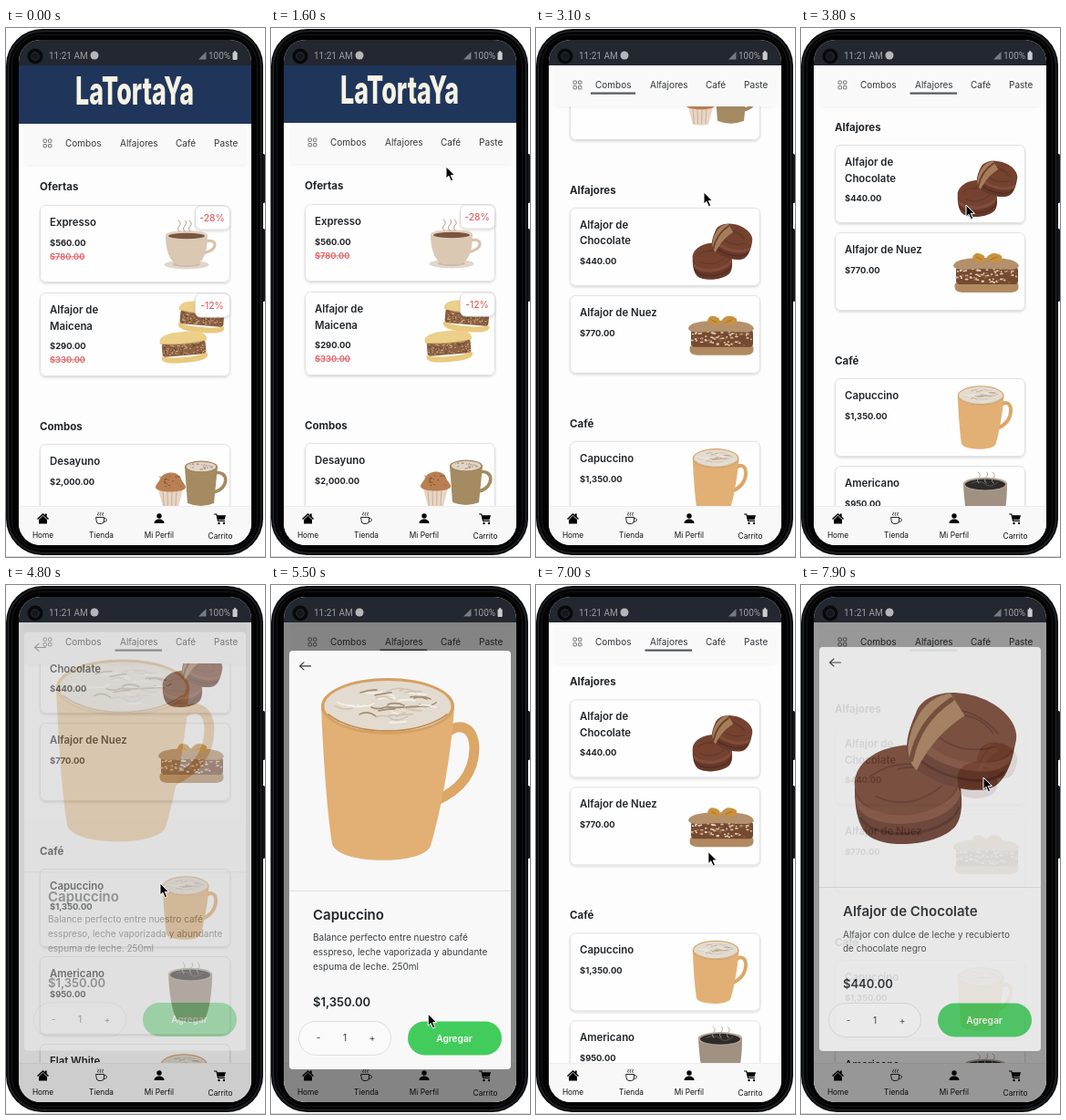
An HTML page that plays this animation: 284 by 580 pixels, repeating every 8 s.

```html
<!DOCTYPE html>
<html lang="es">
<head>
<meta charset="utf-8">
<title>Cafetería</title>
<style>
html, body { margin: 0; width: 100%; height: 100%; overflow: hidden; background: #fff; }
svg { display: block; width: 284px; height: 580px; font-family: Inter, "Open Sans", sans-serif; }
</style>
</head>
<body>
<svg id="stage" viewBox="0 0 284 580" xmlns="http://www.w3.org/2000/svg"></svg>
<script>
const INK = '#212529', RED = '#df6265';

// c is the vertical centre of the capitals
function text(x, c, size, str, { w = 400, fill = INK, more = '' } = {}) {
  return `<text x="${x}" y="${(c + size * 0.36).toFixed(2)}" font-size="${size}" font-weight="${w}" fill="${fill}" ${more}>${str}</text>`;
}
const rect = (x, y, w, h, r, fill, more = '') =>
  `<rect x="${x}" y="${y}" width="${w}" height="${h}" rx="${r}" fill="${fill}" ${more}/>`;
const oval = (x, y, rx, ry, fill, more = '') =>
  `<ellipse cx="${x}" cy="${y}" rx="${rx}" ry="${ry}" fill="${fill}" ${more}/>`;
const path = (d, fill, more = '') => `<path d="${d}" fill="${fill}" ${more}/>`;
const line = (d, stroke, w = 1) =>
  path(d, 'none', `stroke="${stroke}" stroke-width="${w}" stroke-linecap="round" stroke-linejoin="round"`);
const at = (x, y, body, more = '') => `<g transform="translate(${x} ${y}) ${more}">${body}</g>`;
const centred = 'text-anchor="middle"';

function seeded(seed) {
  return () => (seed = (seed * 16807) % 2147483647) / 2147483647;
}
function specks(n, x, y, w, h, fill, size, seed) {
  const rnd = seeded(seed);
  let out = '';
  for (let i = 0; i < n; i++) {
    out += oval((x + rnd() * w).toFixed(1), (y + rnd() * h).toFixed(1), (size * (0.6 + rnd())).toFixed(1), (size * 0.7).toFixed(1), fill);
  }
  return out;
}
const steam = (xs, y, stroke) =>
  xs.map((x, i) => line(`M${x} ${y}q-3-3 0-6t${i % 2 ? 1 : -1}-6`, stroke, 0.9)).join('');

// ---- food drawings ----
function espresso() {
  return oval(198, 259.5, 24.5, 5, '#e2d5cc') + oval(198, 259, 15, 3, '#cdbaa8') +
    line('M219 234c14-4 14 11-4 13', '#d6c1aa', 3) +
    path('M175 227c0 18 5 30 14 33h18c10-3 14-15 14-33z', '#dac8b3') +
    oval(198, 227, 23, 5, '#e2d2c0') + oval(198, 228, 20, 3.2, '#7a5641') +
    steam([190, 196, 202], 223, '#a58f82');
}
function sandwich(x, y, turn, seed) {
  return at(x, y,
    rect(-24, -6, 48, 15, 3, '#8e6143') + specks(80, -23, -4, 46, 12, '#d6b790', 0.7, seed) +
    specks(45, -23, -4, 46, 12, '#5f3d2a', 0.7, seed + 8) +
    path('M-26-7c0-7 8-10 26-10s26 3 26 10c0 4-52 4-52 0z', '#ecd08a') +
    path('M-25 8c8 4 42 4 50 0 2 6-4 9-25 9s-27-3-25-9z', '#e9c97e') +
    line('M-25-6c14 3 36 3 50 0', '#d8b56e', 0.8), `rotate(${turn})`);
}
function breakfast() {
  return path('M167 506l5 19q9 2 17 0l5-19z', '#e7d6c5') +
    [172, 177, 182, 187].map(x => line(`M${x} 508l${(180 - x) * 0.15} 16`, '#c4a48b', 0.8)).join('') +
    path('M164 504c0-4 4-6 5-10 4-8 19-9 23 0 1 4 5 6 5 10-2 6-31 6-33 0z', '#b97f52') +
    specks(16, 169, 491, 23, 13, '#855235', 0.9, 31) +
    line('M228 488c17-4 17 17 0 21', '#a48b62', 3.6) +
    path('M196 481l3 40q15 6 29 0l4-40z', '#a48b62') +
    oval(214, 481, 18, 6.4, '#a1835e') + oval(214, 481, 16.3, 5.2, '#e0d5c8') +
    specks(24, 202, 478, 24, 6, '#a88a72', 0.8, 77);
}
function nutBar() {
  return path('M169 768c20-3 49-3 69 0 2 8-2 10-10 10h-48c-9 0-13-2-11-10z', '#b18a62') +
    rect(170, 750, 68, 19, 4, '#754a31') + specks(62, 171, 751, 65, 16, '#e0cab0', 1.3, 5) +
    specks(36, 171, 751, 65, 16, '#93623f', 1.2, 15) +
    path('M167 749c1-7 14-9 36-9s34 2 36 9c-3 6-13 3-36 3s-33 3-36-3z', '#b4906c') +
    path('M188 741c1-8 8-7 13-3 2 6-1 8-6 7zM203 741c4-8 12-7 17-3 1 6-4 8-10 7z', '#c9923f') +
    line('M192 739l6 3M208 742l7-3', '#9b6a2b', 0.8);
}
function americano() {
  return path('M178 988c1 22 4 40 9 49 8 4 24 4 31 0 5-10 8-28 8-49z', '#a19182') +
    oval(202, 988, 24.3, 7.3, '#b3a496') + oval(202, 988.5, 22, 6, '#2d2a29') +
    line('M187 987q9-4 15 1t14-2', '#5a5653', 0.9) + steam([195, 203, 211], 987, '#aaa39d');
}
// the next two are drawn at dialog size around their own centre
function mug() {
  const rnd = seeded(19);
  let foam = '';
  for (let i = 0; i < 34; i++) {
    const a = rnd() * 6.28, r = Math.sqrt(rnd());
    const x = -24 + Math.cos(a) * r * 48, y = -69 + Math.sin(a) * r * 20;
    foam += line(`M${x.toFixed(0)} ${y.toFixed(0)}q9 ${(rnd() * 10 - 5).toFixed(0)} 18 ${(rnd() * 6 - 3).toFixed(0)}`,
      ['#cfc3b4', '#f5f1ea', '#a48d76'][i % 3], 1.6);
  }
  return line('M47-36C60-52 81-50 81-22C80 8 62 24 40 34', '#dca666', 11) +
    path('M-87-68C-85-20-81 45-75 82C-68 105 24 106 33 84C45 44 56-20 59-68z', '#e2b074') +
    oval(-14, -69, 73, 31, '#d5a062') + oval(-14, -69, 69.5, 28, '#e3dbcf') + foam +
    line('M-79-60C-50-36 20-36 51-60', '#bf8a50', 1.6);
}
function chocolate() {
  const disc = (x, y, turn, bite) => at(x, y,
    path('M-57-16c-3 21-1 39 8 49 18 18 80 18 98 0 9-10 11-28 8-49z', '#66382a') +
    path('M-57-7c12 31 102 31 114 0v10c-12 31-102 31-114 0z', '#814d3a') +
    line('M-54 16c14 27 94 27 108 0', '#4d291f', 2.5) +
    oval(0, -17, 57, 35, '#74422f') +
    line('M-40-24q38-20 76 3M-35-4q35 19 72-3M-8-29q24-3 38 9', '#5c3225', 1.8) +
    (bite ? path('M-27-47C-50-38-59-12-55 18C-52 30-46 37-38 41C-33 12-22-10-5-29z', '#a67d5a') +
      line('M-24-41C-42-20-50 4-47 32', '#6d402b', 5) : ''), `rotate(${turn}) scale(1 ${bite ? 1.04 : 1.1})`);
  return disc(-30, 31, -6, false) + disc(28, -28, 17, true);
}

// ---- page ----
function card(y, h, titles, price, old, off, art) {
  const twoLines = titles.length > 1, p = y + (twoLines ? 58.5 : 41.5);
  let out = rect(37.5, y + 0.5, 208, h - 1, 6, '#fefefe', 'stroke="#e0e0e0" filter="url(#soft)"') + art;
  titles.forEach((s, i) => out += text(48, y + 19 + i * 17.5, 11.4, s, { w: 600 }));
  out += text(48, p, 9.4, price, { w: 700 });
  if (old) out += text(48, p + 15, 9.4, old, { w: 600, fill: RED, more: 'text-decoration="line-through"' });
  if (off) out += rect(207.5, y + 1, 38, 26, 6, '#fefefe', 'stroke="#dcdcdc" filter="url(#soft)"') +
    text(226, y + 14, 10.3, off, { w: 500, fill: RED, more: centred });
  return out;
}
const heading = (c, s) => text(37, c, 11.5, s, { w: 650 });

function page() {
  return rect(14, 41, 255, 64, 0, '#20355a') +
    `<text transform="translate(141 84) scale(.64 1)" font-size="42" font-weight="800" fill="#f5f3e4" ${centred}>LaTortaYa</text>` +
    heading(174, 'Ofertas') +
    card(194, 85, ['Expresso'], '$560.00', '$780.00', '-28%', espresso()) +
    card(290, 92, ['Alfajor de', 'Maicena'], '$290.00', '$330.00', '-12%',
      sandwich(215, 317, 5, 3) + sandwich(195, 350, -5, 11)) +
    heading(437, 'Combos') + card(456, 86, ['Desayuno'], '$2,000.00', '', '', breakfast()) +
    heading(597, 'Alfajores') +
    card(616, 86, ['Alfajor de', 'Chocolate'], '$440.00', '', '', at(204.5, 664.5, chocolate(), 'scale(.37)')) +
    card(712, 86, ['Alfajor de Nuez'], '$770.00', '', '', nutBar()) +
    heading(853, 'Café') +
    card(872, 86, ['Capuccino'], '$1,350.00', '', '', at(202, 915, mug(), 'scale(.347)')) +
    card(968, 86, ['Americano'], '$950.00', '', '', americano()) +
    card(1064, 86, ['Flat White'], '$1,200.00', '', '', at(200, 1110, mug(), 'scale(.347)'));
}
function tabs() {
  const grid = [[41, 122], [46.5, 122], [41, 127.5], [46.5, 127.5]]
    .map(([x, y]) => rect(x, y, 3.4, 3.4, 0.6, 'none', 'stroke="#666" stroke-width=".9"')).join('');
  const label = (x, s, more = '') => text(x, 126, 10, s, { fill: '#33373b', more });
  return rect(22, 105, 240, 45, 0, '#f9f9f9', 'filter="url(#haze)"') + grid +
    label(65, 'Combos') + label(125, 'Alfajores') + label(186, 'Café') +
    label(228, 'Pastelería', 'clip-path="url(#tabEnd)"') +
    rect(0, 134.5, 0, 2.2, 0, '#55585c', 'id="mark"');
}
function nav() {
  const label = (x, s, c = 556) => text(x, c, 8.3, s, { fill: '#111', more: centred });
  return rect(14, 524, 255, 43, 0, '#f8f8f8') + rect(14, 524, 255, 0.8, 0, '#ececec') +
    path('M34 538l6.5-6 2.2 2v-1.6h2v3.4l2.3 2.2-1 1-5.5-5-5.5 5zM36 539l4.5-4.2 4.5 4.2v4.5h-9z', '#000') +
    line('M99 536.5h8.5v3.5q0 3.5-3 3.5h-2.5q-3 0-3-3.5zM107.5 537.5c4-.5 4 4 0 4M101 534.5q-1-1 0-2t0-1.5M103.5 534.5q-1-1 0-2t0-1.5M106 534.5q-1-1 0-2t0-1.5', '#111', 0.9) +
    oval(168, 535, 2.7, 2.7, '#000') + path('M162.5 543c0-6 11-6 11 0z', '#000') +
    line('M228.5 533h2.3l1.8 7.5h7', '#000', 1.1) + path('M231 534.2h10l-1.5 5h-7.3z', '#000') +
    oval(233.5, 543, 1.2, 1.2, '#000') + oval(239, 543, 1.2, 1.2, '#000') +
    label(40.5, 'Home') + label(104.5, 'Tienda') + label(168, 'Mi Perfil') + label(235, 'Carrito', 557);
}
function status() {
  const style = { fill: '#9da0a4', more: 'font-family="Roboto, sans-serif"' };
  return rect(14, 13, 255, 28, 0, '#23272f') +
    oval(32, 31, 8.5, 8.5, '#08090b') + oval(32, 31, 4.3, 4.3, '#14171d', 'stroke="#2a2e37"') +
    text(47, 30.5, 10, '11:21 AM', style) + oval(97, 30, 4.5, 4.5, '#b4b6b9') +
    path('M211 34.5h8.5v-8.5z', '#777b80') + text(222, 30.5, 10, '100%', style) +
    rect(248.5, 26.5, 5.2, 8.5, 1, '#c9cbcd') + rect(250, 25.2, 2.2, 2, 0, '#c9cbcd');
}
function dialog(title, lines, price, art) {
  const extra = lines.length * 16 - 32, q = 409 + extra, sign = { fill: '#333', more: centred };
  return rect(20, 0, 243, 443 + extra, 4, '#f8f8f8') +
    line('M31.5 17h12M36 13l-4.5 4 4.5 4', '#333', 1.1) + art +
    rect(20, 263, 243, 0.9, 0, '#dcdcdc') +
    text(46, 290, 15, title, { w: 600 }) +
    lines.map((s, i) => text(46, 315 + i * 15.8, 10, s, { fill: '#3b3f43' })).join('') +
    text(46, 369 + extra, 13, price, { w: 600 }) +
    rect(30.5, q - 18.5, 101, 37, 18.5, '#fafafa', 'stroke="#dedede"') +
    text(52, q, 10, '-', sign) + text(81, q, 10, '1', sign) + text(111, q, 10, '+', sign) +
    rect(150, q - 18.5, 103, 37, 18.5, '#42cc5c') +
    text(201, q, 10.2, 'Agregar', { w: 600, fill: '#fff', more: centred });
}

const stage = document.getElementById('stage');
stage.innerHTML = `<defs>
  <clipPath id="screen"><rect x="14" y="13" width="255" height="554" rx="24"/></clipPath>
  <clipPath id="tabEnd"><rect x="226" y="110" width="28.5" height="32"/></clipPath>
  <filter id="soft" x="-10%" y="-10%" width="120%" height="130%"><feDropShadow dx="0" dy="1.5" stdDeviation="1.3" flood-opacity=".14"/></filter>
  <filter id="haze" x="-5%" y="-5%" width="110%" height="115%"><feDropShadow dx="0" dy="1" stdDeviation="2" flood-opacity=".05"/></filter>
</defs>` +
  rect(0, 579, 284, 1, 0, '#d6d6d6') +
  rect(279, 138, 5, 54, 1.5, '#15171a') + rect(279, 220, 5, 80, 1.5, '#15171a') +
  rect(0, 1, 282, 577, 40, '#0b0c0e') +
  rect(2.5, 3.5, 277, 572, 38, '#040405', 'stroke="#24282b" stroke-width="1.2"') +
  rect(6.5, 7.5, 269, 564, 33, '#020202', 'stroke="#121416" stroke-width="1.2"') +
  '<g clip-path="url(#screen)">' + rect(14, 13, 255, 554, 0, '#fdfdfd') +
  `<g id="page">${page()}</g><g id="tabs">${tabs()}</g>` + nav() +
  rect(14, 41, 255, 526, 0, '#000', 'id="shade"') +
  `<g id="coffee">${dialog('Capuccino', ['Balance perfecto entre nuestro café', 'esspreso, leche vaporizada y abundante', 'espuma de leche. 250ml'], '$1,350.00', at(142, 130, mug()))}</g>` +
  `<g id="choco">${dialog('Alfajor de Chocolate', ['Alfajor con dulce de leche y recubierto', 'de chocolate negro'], '$440.00', at(147.5, 133.5, chocolate()))}</g>` +
  status() + '</g>' +
  '<g id="cursor" stroke="#fff" stroke-width="1" stroke-linejoin="round">' +
  path('M0 1v13l3-2.7 2.3 5.4 2.4-1-2.4-5.3h4.2z', '#000', 'id="arrow"') +
  path('M-1.5 1.5c0-2 3-2 3 0v5c1-1 3-.6 3 .8 1-.8 2.8-.3 2.8 1 1.3-.7 2.7 0 2.7 1.5 0 4-1.5 5-1.5 8.5h-8c-1-3-4-5-5.5-8-.6-1.7 1.2-2.6 2.3-1.4l1.2 1.5zM2.5 12v3.5M5 12v3.5', '#fff', 'id="hand" stroke="#222"') + '</g>';

// ---- motion ----
const scrolls = [[1500, 0], [1600, 1], [1900, 70], [2600, 168.4], [2800, 168.4], [3400, 455],
  [3500, 455], [3800, 488], [4300, 561], [6700, 561], [7600, 461]];
const xs = [[1000, 285], [1500, 192], [1900, 192], [2500, 187], [2800, 187], [3400, 181], [3800, 181],
  [4500, 169], [5200, 169], [5700, 174], [5900, 174], [6100, 172], [6700, 185], [7600, 200]];
const ys = [[1000, 225], [1500, 151], [1900, 151], [2500, 165], [2800, 165], [3400, 193], [3800, 193],
  [4500, 326], [5200, 326], [5700, 547], [5900, 547], [6100, 501], [6700, 320], [7600, 210]];
// section top, underline x and width
const marks = [[853, 181, 32], [597, 119.5, 51.5], [437, 60, 49]];

const clamp = v => Math.max(0, Math.min(1, v));
const easeOut = u => 1 - (1 - u) ** 3;
const smooth = u => u * u * (3 - 2 * u);
function track(keys, t, ease) {
  if (t <= keys[0][0]) return keys[0][1];
  for (let i = 1; i < keys.length; i++) {
    const [t0, a] = keys[i - 1], [t1, b] = keys[i];
    if (t <= t1) return a + (b - a) * ease((t - t0) / (t1 - t0));
  }
  return keys[keys.length - 1][1];
}
const $ = id => document.getElementById(id);
const set = (id, name, v) => $(id).setAttribute(name, v);
const move = (id, x, y) => set(id, 'transform', `translate(${x.toFixed(2)} ${y.toFixed(2)})`);
const show = (id, on) => set(id, 'visibility', on ? 'visible' : 'hidden');

// fades in 150 ms while it drops 33 px in 300 ms; closing runs it back
function pose(id, h, opens, closes, t) {
  const closing = t >= closes;
  const phase = ms => closing ? 1 - clamp((t - closes) / ms) : clamp((t - opens) / ms);
  const fade = phase(150) ** 1.3;
  move(id, 0, 301.4 - h / 2 - 33 * (1 - phase(300)) ** 1.8);
  set(id, 'opacity', fade);
  show(id, fade > 0);
  return fade;
}
function draw(t) {
  const s = track(scrolls, t, easeOut);
  move('page', 0, -s);
  move('tabs', 0, -Math.min(s, 64));
  const mark = marks.find(m => m[0] - s < 150);
  show('mark', !!mark);
  if (mark) { set('mark', 'x', mark[1]); set('mark', 'width', mark[2]); }

  const a = pose('coffee', 459, 4730, 5830, t);
  const b = pose('choco', 443, 7770, 9000, t);
  set('shade', 'opacity', 0.47 * Math.max(a, b));

  const hand = t >= 6000 && t < 6500;
  move('cursor', track(xs, t, smooth), track(ys, t, smooth));
  show('arrow', t >= 1100 && !hand);
  show('hand', hand);
}
function tick() {
  draw(Math.floor(performance.now() % 8000 / 100) * 100);
  requestAnimationFrame(tick);
}
tick();
</script>
</body>
</html>
```
